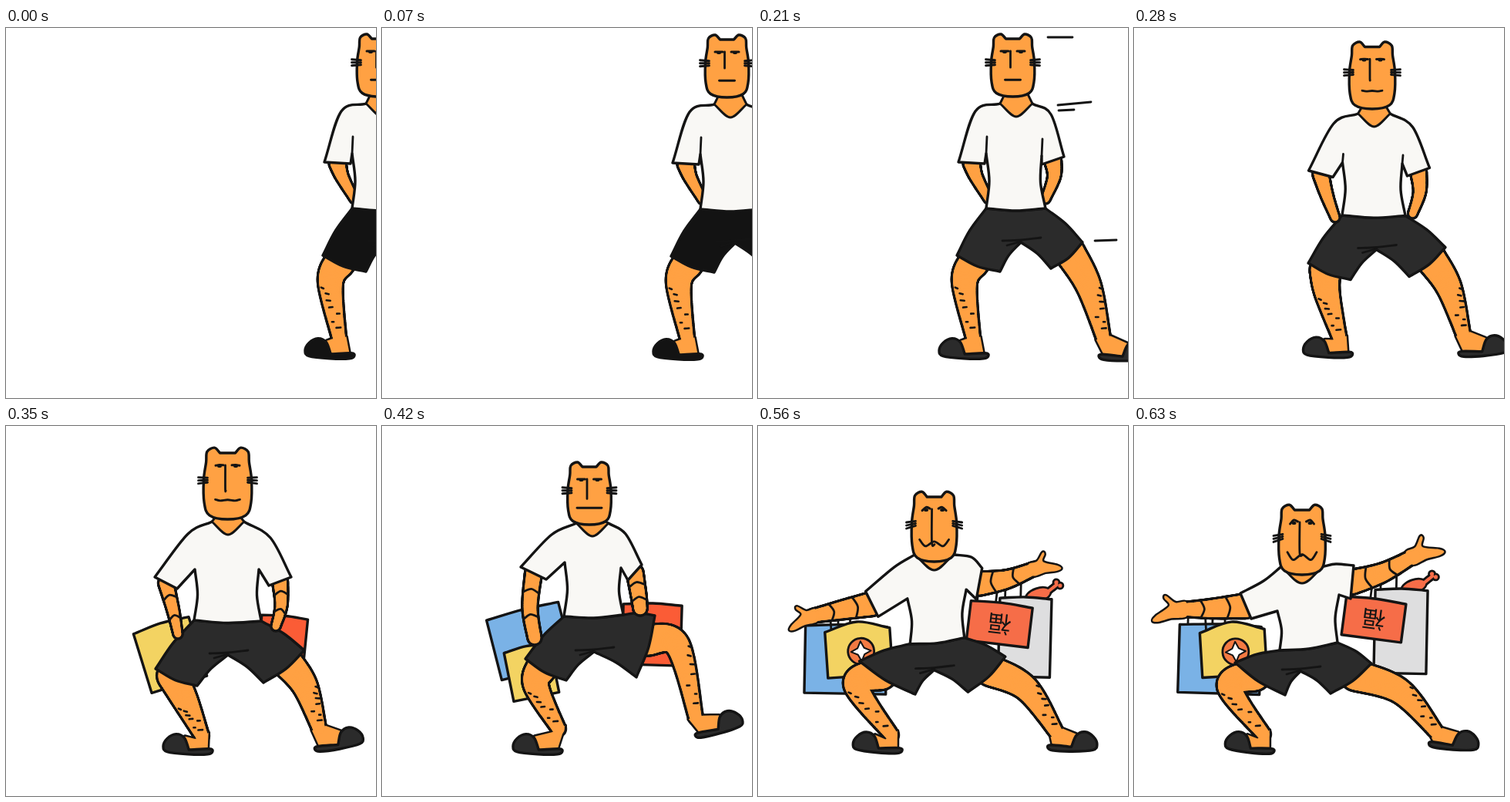
Write an HTML page with a canvas that moves like this. It is 480 px wide and 480 px high and loops after 910 ms.

```html
<!DOCTYPE html>
<html lang="en">
<head>
<meta charset="utf-8">
<title>Shopping squat</title>
<style>
html, body { margin: 0; width: 100%; height: 100%; overflow: hidden; background: #fff; }
canvas { display: block; width: 100vmin; height: 100vmin; }
</style>
</head>
<body>
<canvas id="stage" width="480" height="480"></canvas>
<script>
const ctx = document.getElementById('stage').getContext('2d');
const INK = '#141414', SKIN = '#ffa143', CLOTH = '#f9f8f5', LINE = 3.4;
const BAG = { blue: '#7ab2e6', yellow: '#f3d362', grey: '#dededf', red: '#fb5c36' };
const STEP = 70, LOOP = 910;

// head: x, top, half width, height; face: nose length, mouth half width, smile
// neck: x, collar bottom, half width; sleeve: outer and inner cuff; hem: outer and inner leg
// arm: elbow, wrist; leg: knee, ankle; foot: toe, tilt; bags: x, y, width, height, tilt
const walk = {
  head: [330.5, 14, 28, 75], face: [21, 10, 0], neck: [335, 115, 21],
  crotch: [341, 278], arms: [11, 6], open: 0, fold: 22, bags: {},
  L: { shoulder: [282, 108], sleeve: [260, 174, 294, 176], pit: [296, 163], waist: [296, 234],
    hem: [258, 295, 314, 316], arm: [283, 193, 299, 222], leg: [268, 330, 279, 402], foot: [235, 425, 0] },
  R: { shoulder: [380, 112], sleeve: [397, 167, 368, 177], pit: [368, 166], waist: [373, 234],
    hem: [421, 278, 380, 312], arm: [384, 193, 373, 222], leg: [429, 335, 448, 402], foot: [506, 430, -.06] }
};
const drop = {
  head: [287.5, 35, 31, 86], face: [33, 16, .15], neck: [288, 141, 21],
  crotch: [288, 297], arms: [10, 6], open: 0, fold: 0,
  bags: { yellow: [213, 297, 75, 80, -.3], red: [358, 285, 60, 74, .1] },
  L: { shoulder: [236, 140], sleeve: [193, 196, 222, 211], pit: [245, 186], waist: [244, 252],
    hem: [194, 315, 248, 337], arm: [217, 240, 223, 270], leg: [233, 357, 254, 402], foot: [204, 422, 0] },
  R: { shoulder: [343, 145], sleeve: [370, 196, 341, 207], pit: [328, 186], waist: [331, 253],
    hem: [387, 291, 334, 333], arm: [357, 233, 350, 260], leg: [388, 338, 406, 392], foot: [464, 411, .13] }
};
const lift = {
  head: [269, 53, 28, 75], face: [25, 16, 0], neck: [273, 143, 21],
  crotch: [275, 293], arms: [11, 9], open: 0, fold: 0,
  bags: { blue: [192, 279, 96, 80, -.25], yellow: [194, 320, 60, 64, -.2], red: [350, 271, 76, 78, .03] },
  L: { shoulder: [220, 141], sleeve: [180, 183, 213, 199], pit: [237, 177], waist: [236, 247],
    hem: [186, 302, 239, 330], arm: [192, 236, 198, 275], leg: [200, 337, 229, 393], foot: [170, 422, 0] },
  R: { shoulder: [316, 140], sleeve: [337, 180, 319, 200], pit: [310, 184], waist: [313, 245],
    hem: [354, 246, 330, 326], arm: [333, 220, 335, 237], leg: [383, 284, 407, 378], foot: [469, 388, .22] }
};
const squat = {
  head: [241, 72, 28, 84], face: [50, 19, .7], neck: [241, 167, 23],
  crotch: [243, 315], arms: [13, 6], open: 0, fold: 0,
  bags: { blue: [130, 306, 104, 84, -.05], yellow: [142, 291, 86, 70, -.12],
    grey: [347, 322, 62, 62, .06], red: [327, 294, 95, 62, .05] },
  L: { shoulder: [187, 162], sleeve: [149, 200, 179, 231], pit: [203, 205], waist: [207, 273],
    hem: [132, 303, 213, 347], arm: [146, 252, 126, 300], leg: [131, 333, 179, 402], foot: [129, 420, 0] },
  R: { shoulder: [295, 160], sleeve: [326, 205, 297, 229], pit: [275, 204], waist: [272, 267],
    hem: [336, 289, 293, 343], arm: [325, 252, 336, 286], leg: [351, 336, 381, 398], foot: [432, 420, .03] }
};
const spread = {
  head: [218, 109, 30, 84], face: [42, 19, 1], neck: [218, 204, 27],
  crotch: [216, 318], arms: [16, 9], open: 1, fold: 0,
  bags: { blue: [111, 303, 106, 88, .03], yellow: [129, 295, 84, 58, -.06],
    grey: [346, 267, 68, 108, .02], red: [311, 251, 78, 50, .13] },
  L: { shoulder: [168, 201], sleeve: [138, 217, 152, 250], pit: [186, 240], waist: [189, 291],
    hem: [131, 307, 196, 349], arm: [100, 237, 60, 238], leg: [124, 338, 168, 400], foot: [118, 418, .06] },
  R: { shoulder: [262, 179], sleeve: [285, 181, 281, 224], pit: [266, 219], waist: [264, 281],
    hem: [308, 308, 255, 347], arm: [323, 190, 364, 168], leg: [345, 344, 393, 398], foot: [446, 420, -.12] }
};

const lerp = (a, b, t) => a + (b - a) * t;
const FAST = ['arm', 'arms', 'open', 'bags', 'sleeve'];

// Blends two poses; arms and bags may run ahead of the body.
function mix(a, b, t, fast = t) {
  if (typeof a === 'number') return lerp(a, b, t);
  if (Array.isArray(a)) return a.map((v, i) => lerp(v, b[i], t));
  return Object.fromEntries(Object.keys(a).map(
    k => [k, mix(a[k], b[k], FAST.includes(k) ? fast : t, fast)]));
}

const cels = [
  { pose: walk, dx: 153, dark: '#131313', speed: true },
  { pose: walk, dx: 117, dy: 1, dark: '#131313', speed: true },
  { pose: walk, dx: 65.5, dy: 2, dark: '#131313', speed: true },
  { pose: walk, speed: true },
  { pose: mix(walk, drop, .5) },
  { pose: drop },
  { pose: lift },
  { pose: squat },
  { pose: mix(squat, spread, .54, .86) },
  { pose: spread }
];

const pt = (x, y, corner = false) => ({ x, y, corner });
const corner = ([x, y]) => pt(x, y, true);

// Middle of a and b, pushed sideways by k.
function bow([ax, ay], [bx, by], k) {
  const d = Math.hypot(bx - ax, by - ay) || 1;
  return pt((ax + bx) / 2 - (by - ay) / d * k, (ay + by) / 2 + (bx - ax) / d * k);
}

// Smooth curve through points, sharp at corners.
function trace(pts, closed) {
  const n = pts.length;
  const at = i => closed ? pts[(i + n) % n] : pts[Math.max(0, Math.min(n - 1, i))];
  ctx.beginPath();
  ctx.moveTo(pts[0].x, pts[0].y);
  for (let i = 0; i < (closed ? n : n - 1); i++) {
    const p = at(i), q = at(i + 1);
    const [a, k] = p.corner ? [p, 3] : [at(i - 1), 6];
    const [b, m] = q.corner ? [q, 3] : [at(i + 2), 6];
    ctx.bezierCurveTo(p.x + (q.x - a.x) / k, p.y + (q.y - a.y) / k,
      q.x - (b.x - p.x) / m, q.y - (b.y - p.y) / m, q.x, q.y);
  }
  if (closed) ctx.closePath();
}

function stroke(width = LINE) {
  ctx.lineWidth = width;
  ctx.stroke();
}

function fill(pts, color, width) {
  trace(pts, true);
  ctx.fillStyle = color;
  ctx.fill();
  stroke(width);
}

function line(pts, width = 2.8) {
  trace(pts.map(p => pt(...p)), false);
  stroke(width);
}

function disc(x, y, r, color) {
  ctx.beginPath();
  ctx.arc(x, y, r, 0, Math.PI * 2);
  ctx.fillStyle = color;
  ctx.fill();
}

// Limb axis through three [x, y, radius] joints, with its outward normal.
function spine(joints, s) {
  const at = t => {
    const i = t < .5 ? 0 : 1, u = t * 2 - i;
    return [0, 1, 2].map(k => {
      const [a, p, q, b] = [-1, 0, 1, 2].map(o => joints[Math.max(0, Math.min(2, i + o))][k]);
      return p + u / 2 * (q - a + u * (2 * a - 5 * p + 4 * q - b + u * (3 * (p - q) + b - a)));
    });
  };
  return t => {
    const [x, y, r] = at(t), [x0, y0] = at(t - .01), [x1, y1] = at(t + .01);
    const d = Math.hypot(x1 - x0, y1 - y0) || 1, ux = (x1 - x0) / d, uy = (y1 - y0) / d;
    return { r, place: (u, v) => [x + ux * u - s * uy * v, y + uy * u + s * ux * v] };
  };
}

// Limb and its end piece share one outline.
function limb(axis, tip) {
  for (const [color, grow] of [[INK, LINE / 2], [SKIN, -LINE / 2]]) {
    if (tip) {
      trace(tip, true);
      if (grow > 0) stroke(5);
      ctx.fillStyle = color;
      ctx.fill();
    }
    for (let i = 0; i <= 60; i++) {
      const a = axis(i / 60);
      disc(...a.place(0, 0), a.r + grow, color);
    }
  }
}

function arm(side, s, [r0, r1], open, bands) {
  const [ox, oy, ix, iy] = side.sleeve, [ex, ey, wx, wy] = side.arm;
  const axis = spine([[(ox + ix) / 2, (oy + iy) / 2, r0], [ex, ey, (r0 + r1) / 2], [wx, wy, r1]], s);
  const end = axis(1), hand = (u, v) => pt(...end.place(u * open, v * open));
  limb(axis, open > .3 && [hand(-8, 9), hand(6, 9), hand(18, 18), hand(20, 15), hand(14, 5),
    hand(32, -8), hand(36, -14), hand(28, -15), hand(12, -11), hand(-8, -9)]);
  if (bands) for (const t of [.3, .65]) {
    const a = axis(t);
    line([a.place(0, a.r), a.place(-5, 0), a.place(0, -a.r)]);
  }
}

function leg(side, s, dark) {
  const [ox, oy, ix, iy] = side.hem, [kx, ky, ax, ay] = side.leg, [tx, ty, tilt] = side.foot;
  const axis = spine([[lerp(ox, ix, .4), lerp(oy, iy, .4), 20], [kx, ky, 16.5], [ax, ay, 9.5]], s);
  const cos = Math.cos(tilt) * 64, sin = Math.sin(tilt) * 64;
  const foot = (u, v, sharp) => pt(tx + s * (cos * u + sin * v), ty + sin * u - cos * v, sharp);
  const end = axis(1);
  limb(axis, [corner(end.place(0, end.r)), foot(.44, .3, true), foot(.52, .04, true),
    foot(.9, .04, true), corner(end.place(0, -end.r))]);
  fill([foot(0, .1), foot(.08, .26), foot(.26, .35), foot(.43, .27), foot(.52, .03, true),
    foot(.93, .05), foot(1, 0), foot(.9, -.06), foot(.5, -.06), foot(.08, -.01)], dark);
  let seed = 7;
  const rnd = () => (seed = seed * 16807 % 2147483647) / 2147483647;
  rnd();
  for (let i = 0; i < 7; i++) {
    const a = axis(.55 + i * .055), v = (rnd() * 1.5 - .6) * a.r, len = 2 + rnd() * 4;
    const [x, y] = a.place(0, v);
    line([[x, y], [x + len, y + 2 - rnd() * 3]], 2.6);
  }
}

function bag(name, [x, y, w, h, tilt], open) {
  ctx.save();
  ctx.translate(x, y);
  ctx.rotate(tilt);
  if (open > .5) for (const u of [-.4, -.1]) line([[u * w, -h / 2], [u * w, -h / 2 - 20]]);
  if (open > .5 && name === 'grey') drumstick(16, -h / 2 - 5);
  fill([pt(-w / 2, -h / 2, true), pt(0, -h / 2 - (name === 'yellow' ? 3 + 9 * open : 2)),
    pt(w / 2, -h / 2, true), pt(w / 2, h / 2, true), pt(-w / 2, h / 2, true)],
    name === 'red' && open > .5 ? '#f66d48' : BAG[name]);
  if (open > .5 && name === 'yellow') coin();
  if (open > .5 && name === 'red') label();
  ctx.restore();
}

function drumstick(x, y) {
  for (const [color, grow] of [[INK, 1.4], ['#f66d48', -1.4]]) {
    ctx.beginPath();
    ctx.ellipse(x, y, 17 + grow, 9 + grow, -.35, 0, Math.PI * 2);
    ctx.fillStyle = color;
    ctx.fill();
    for (let i = 0; i < 9; i++) disc(x + 14 + i * 1.2, y - 6 - i, 3.5 + grow, color);
    disc(x + 23, y - 17, 4 + grow, color);
    disc(x + 28, y - 13, 4 + grow, color);
  }
}

function coin() {
  disc(3, -2, 17, '#f47a42');
  stroke(2.8);
  ctx.beginPath();
  for (let i = 0; i < 8; i++) {
    const r = i % 2 ? 6 : 13, a = i * Math.PI / 4;
    ctx.lineTo(3 + r * Math.cos(a), -2 + r * Math.sin(a));
  }
  ctx.closePath();
  ctx.fillStyle = '#fff';
  ctx.fill();
  stroke(2);
}

function label() {
  ctx.rotate(Math.PI);
  ctx.font = '500 30px "Noto Sans CJK SC", "Noto Sans CJK", sans-serif';
  ctx.textAlign = 'center';
  ctx.textBaseline = 'middle';
  ctx.fillStyle = INK;
  ctx.fillText('福', 0, 0);
}

const middle = (p, part, k) => bow(p.L[part], p.R[part], k);

function shorts(p, dark) {
  const half = (d, s) => {
    const out = d.hem.slice(0, 2), inn = d.hem.slice(2);
    return [corner(d.waist), bow(d.waist, out, 3 * s), corner(out), bow(out, inn, 4 * s),
      corner(inn), bow(inn, p.crotch, -3 * s)];
  };
  fill([...half(p.L, 1), corner(p.crotch), ...half(p.R, -1).reverse(), middle(p, 'waist', 3)], dark);
  const [x, y] = p.crotch;
  line([[x - 24, y - 2], [x, y - 3], [x + 26, y - 6]]);
  line([[x - 18, y + 4], [x, y - 1]]);
}

function shirt(p) {
  const [nx, ny, nw] = p.neck;
  const half = (d, s) => [pt(nx - s * nw, ny - nw * .8, true), pt(...d.shoulder),
    corner(d.sleeve), corner(d.sleeve.slice(2)), corner(d.pit), bow(d.pit, d.waist, -4 * s), corner(d.waist)];
  fill([...half(p.L, 1), middle(p, 'waist', 3), ...half(p.R, -1).reverse()], CLOTH);
  if (p.fold) for (const { pit: [x, y] } of [p.L, p.R]) line([[x, y], [x + 1, y - p.fold]]);
}

function head(p) {
  const [x, top, w, h] = p.head, [nose, mw, smile] = p.face, [nx, ny, nw] = p.neck;
  const rise = ny - nw * .8, chin = top + h;
  fill([pt(nx - nw * .65, chin - 6, true), pt(nx - nw, rise, true), pt(nx, ny),
    pt(nx + nw, rise, true), pt(nx + nw * .65, chin - 6, true)], SKIN, 3);

  const half = s => [[.32, 0], [.55, -.08], [.86, -.02], [.9, .14], [1, .4], [.98, .75], [.76, .94]]
    .map(([u, v], i) => pt(x + s * u * w, top + v * h, i === 0));
  fill([...half(1), pt(x, chin), ...half(-1).reverse()], SKIN);

  for (const s of [-1, 1]) {
    const ex = x + s * 10.5, ey = top + 16, wy = top + h * .41;
    line([[ex + s * 5, ey + smile * 2], [ex, ey - smile * 3], [ex - s * 5, ey - smile]], 3);
    line([[ex - 1, ey + 1], [ex + 1, ey + 1]], 4);
    for (const k of [-1, 0, 1])
      line([[x + s * (w - 5), wy + k * 3], [x + s * (w + 7), wy + k * 4 + smile * 3]]);
  }
  line([[x - 3, top + 16], [x - 3, top + 14 + nose], [x - 3 + smile * 4, top + 16 + nose]]);
  const my = top + h * .71;
  line([[-1, -5], [-.6, 5], [0, -2], [.6, 5], [1, -5]].map(([u, v]) => [x + u * mw, my + v * smile]));
}

function draw({ pose: p, dx = 0, dy = 0, dark = '#2b2b2b', speed }) {
  ctx.fillStyle = '#fff';
  ctx.fillRect(0, 0, 480, 480);
  ctx.save();
  ctx.translate(dx, dy);
  ctx.strokeStyle = INK;
  ctx.lineJoin = ctx.lineCap = 'round';
  if (speed) {
    line([[376, 12], [408, 12]]);
    line([[389, 100], [432, 96]]);
    line([[390, 107], [410, 106]]);
    line([[437, 276], [465, 275]]);
  }
  for (const name in BAG) if (p.bags[name]) bag(name, p.bags[name], p.open);
  leg(p.L, 1, dark);
  leg(p.R, -1, dark);
  shorts(p, dark);
  arm(p.L, 1, p.arms, p.open, !p.fold);
  arm(p.R, -1, p.arms, p.open, !p.fold);
  shirt(p);
  head(p);
  ctx.restore();
}

const start = performance.now();
let shown = -1;
function tick() {
  const t = (performance.now() - start) % LOOP;
  const i = Math.min(cels.length - 1, Math.floor(t / STEP));
  if (i !== shown) draw(cels[shown = i]);
  requestAnimationFrame(tick);
}
tick();
</script>
</body>
</html>
```
